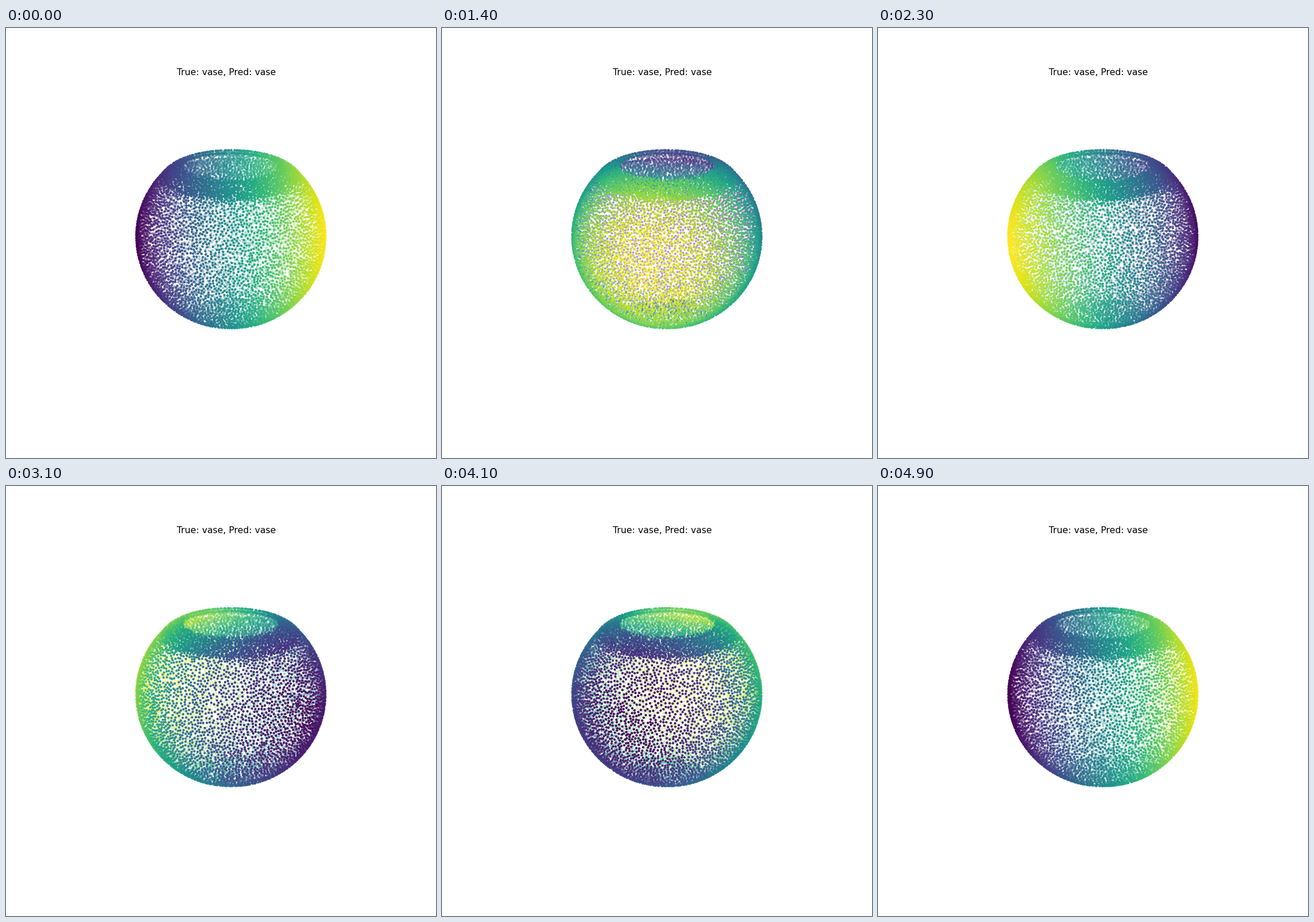
A matplotlib script for the animation above (5000 ms loop, 748 px wide and 748 px high).

```python
import numpy as np
import matplotlib.pyplot as plt
from matplotlib.animation import FuncAnimation

FRAMES = 50
INTERVAL = 100
POINTS = 10000

# Vase profile, in pixels around the centre of the view box
RADIUS, HALF_HEIGHT, CENTRE_Z = 164, 159, 8
BASE_Z, SHOULDER_Z = -136, 114
BULGE, RIM = (109, 133), (82.5, 139)
LIP_THICKNESS = 5

rng = np.random.default_rng(7)


def body_radius(z):
    return RADIUS * np.sqrt(1 - ((z - CENTRE_Z) / HALF_HEIGHT) ** 2)


def line(start, end, n=60):
    return np.linspace(start, end, n)


def bend(start, control, end, n=60):
    t = np.linspace(0, 1, n)[:, None]
    start, control, end = map(np.array, (start, control, end))
    return start * (1 - t) ** 2 + 2 * control * t * (1 - t) + end * t ** 2


def surface_samples(count):
    """Area-uniform random points on the revolved profile."""
    z = np.linspace(BASE_Z, SHOULDER_Z, 200)
    base = (body_radius(BASE_Z), BASE_Z)
    shoulder = (body_radius(SHOULDER_Z), SHOULDER_Z)
    lip = bend(shoulder, BULGE, RIM)
    pieces = [
        line((0, BASE_Z), base),
        np.column_stack([body_radius(z), z]),
        lip,
        lip - (0, LIP_THICKNESS),
        line((0, SHOULDER_Z), shoulder),
    ]
    start = np.vstack([p[:-1] for p in pieces])
    end = np.vstack([p[1:] for p in pieces])
    area = np.hypot(*(end - start).T) * (start[:, 0] + end[:, 0])
    pick = rng.choice(len(area), count, p=area / area.sum())
    t = rng.random((count, 1))
    r, z = (start[pick] * (1 - t) + end[pick] * t).T
    phi = rng.uniform(0, 2 * np.pi, count)
    return np.array([r * np.cos(phi), r * np.sin(phi), z], dtype=np.float32)


def spread_evenly(samples, count):
    """Farthest-point sampling, which gives evenly spaced dots."""
    x, y, z = samples
    nearest = np.full(x.size, np.inf, dtype=np.float32)
    chosen = np.zeros(count, dtype=int)
    for k in range(1, count):
        j = chosen[k - 1]
        dist = (x - x[j]) ** 2 + (y - y[j]) ** 2 + (z - z[j]) ** 2
        np.minimum(nearest, dist, out=nearest)
        chosen[k] = nearest.argmax()
    return samples[:, chosen]


x, y, z = spread_evenly(surface_samples(35000), POINTS)

fig = plt.figure(figsize=(8, 8), dpi=93.5)
ax = fig.add_subplot(projection="3d")
ax.scatter(x, y, z, c=y, cmap="viridis", s=5)
ax.set_xlim(-185.3, 185.3)
ax.set_ylim(-185.3, 185.3)
ax.set_zlim(-139, 139)
ax.set_axis_off()
ax.set_title("True: vase, Pred: vase")


def update(frame):
    ax.view_init(elev=20, azim=frame * 360 / FRAMES)
    return []


anim = FuncAnimation(fig, update, frames=FRAMES, interval=INTERVAL,
                     repeat=True, repeat_delay=0, blit=False)
plt.show()
```
